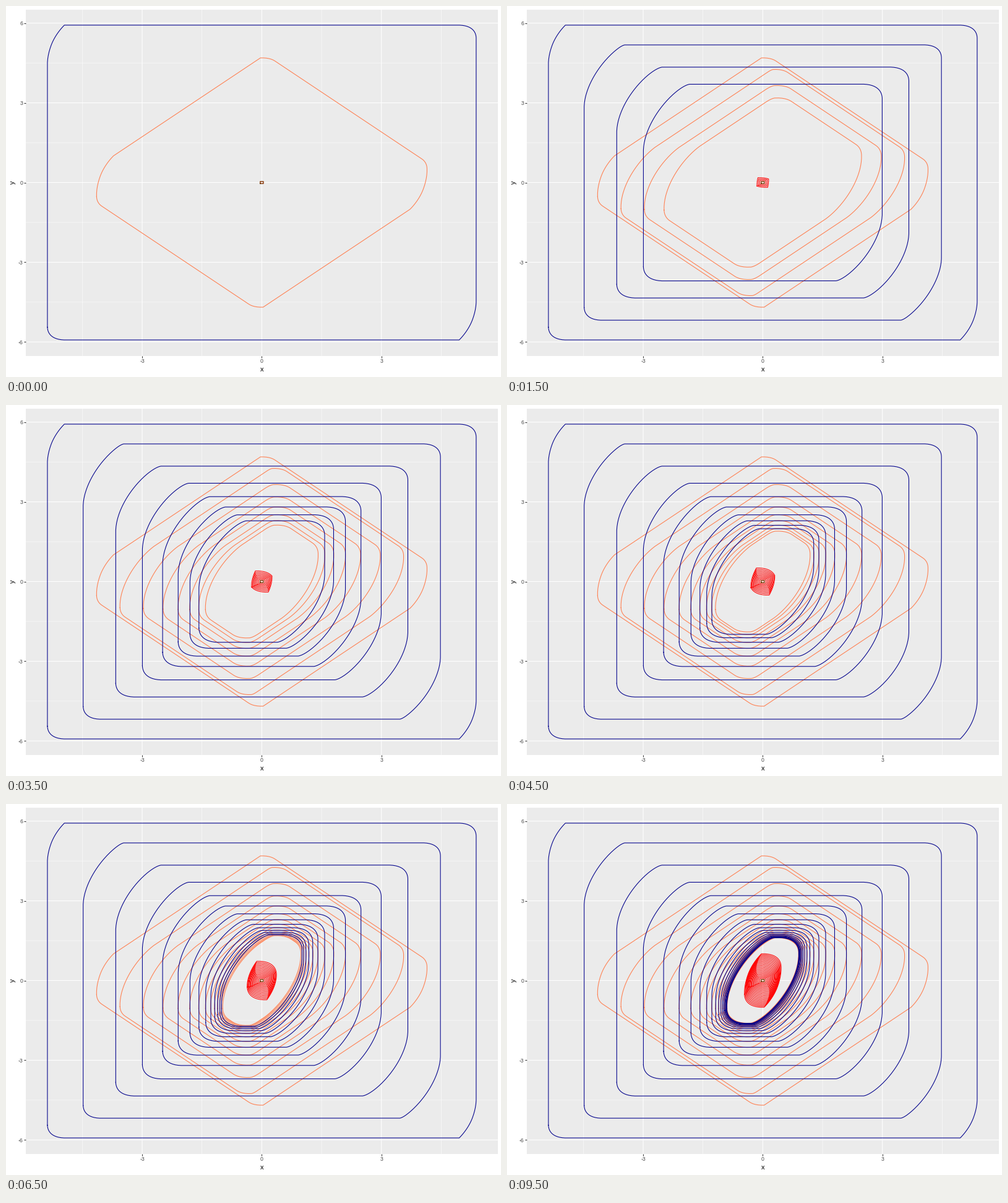
A matplotlib script that plays this animation: 800 px wide and 600 px high, repeating every 10000 ms.

```python
import numpy as np
import matplotlib.pyplot as plt
from matplotlib.animation import FuncAnimation

plt.rcParams["font.family"] = "Liberation Sans"

FRAMES, INTERVAL = 20, 500
STEPS = 20              # sub-steps between two successive outer sets
DT = 0.0565
W = 0.0397              # half-size of the disturbance box
PX = 0.72               # points per pixel at 100 dpi
LINE = 1.07 * PX


def flow(t):
    """exp(A t) for A = [[-2, 1], [-2, 0]]."""
    c, s = np.cos(t), np.sin(t)
    return np.exp(-t) * np.array([[c - s, s], [-2 * s, c + s]])


def generators(n):
    """Generators of the sum of the first n propagated boxes."""
    return np.vstack([W * flow(i * DT).T for i in range(n)])


def zonotope(gens):
    """Closed boundary of the symmetric Minkowski sum of segments."""
    right = np.where(gens[:, :1] < 0, -gens, gens)
    order = np.argsort(np.arctan2(right[:, 1], right[:, 0]))
    edges = 2 * right[order]
    half = np.vstack([[0, 0], np.cumsum(edges, axis=0)]) - edges.sum(axis=0) / 2
    return np.vstack([half, -half])


def padded(n, ball):
    return zonotope(np.vstack([generators(n), ball]))


SQUARE = np.eye(2)
DIAMOND = np.array([[0.5, 0.5], [0.5, -0.5]])


def square_set(k):
    return padded(STEPS * (k + 1), 4.918 * 0.757 ** k * SQUARE)


def diamond_set(k):
    return padded(STEPS * (k + 1), 3.685 * 0.7595 ** k * DIAMOND)


def inner_set(k):
    return zonotope(generators(k + 1))


fig = plt.figure(figsize=(8, 6), dpi=100, facecolor="white")
ax = fig.add_axes([32.3 / 800, 34.5 / 600, 762.2 / 800, 560 / 600],
                  facecolor="#EBEBEB")
x_max, y_max = 1.1 * square_set(0).max(axis=0)
ax.set_xlim(-x_max, x_max)
ax.set_ylim(-y_max, y_max)
ax.set_xticks([-3, 0, 3], ["-3", "0", "3"])
ax.set_yticks([-6, -3, 0, 3, 6], ["-6", "-3", "0", "3", "6"])
ax.set_xticks([-4.5, -1.5, 1.5, 4.5], minor=True)
ax.set_yticks([-4.5, -1.5, 1.5, 4.5], minor=True)
ax.set_axisbelow(True)
ax.grid(which="major", color="white", lw=LINE, snap=False)
ax.grid(which="minor", color="white", lw=LINE / 2, snap=False)
ax.tick_params(which="major", length=2.75 * PX, width=LINE, color="#333333",
               labelcolor="#4D4D4D", labelsize=8.8 * PX, pad=2.2 * PX)
ax.tick_params(which="minor", length=0)
for spine in ax.spines.values():
    spine.set_visible(False)

fig.text(413.3 / 800, 12 / 600, "x", size=11 * PX, ha="center", va="center")
fig.text(11 / 800, 314.5 / 600, "y", size=11 * PX, rotation=90,
         ha="center", va="center")


def outlines(make, color, z):
    return [ax.plot(*make(k).T, color=color, lw=LINE, zorder=z, snap=False)[0]
            for k in range(FRAMES)]


layers = [outlines(diamond_set, "coral", 3),
          outlines(square_set, "darkblue", 4),
          outlines(inner_set, "red", 5)]
ax.plot(*inner_set(0).T, color="darkgreen", lw=LINE, alpha=0.6, zorder=6,
        snap=False)


def draw(frame):
    for layer in layers:
        for k, line in enumerate(layer):
            line.set_visible(k <= frame)
    return [line for layer in layers for line in layer]


animation = FuncAnimation(fig, draw, frames=FRAMES, interval=INTERVAL,
                          init_func=lambda: draw(0), repeat=True,
                          repeat_delay=0)
plt.show()
```
